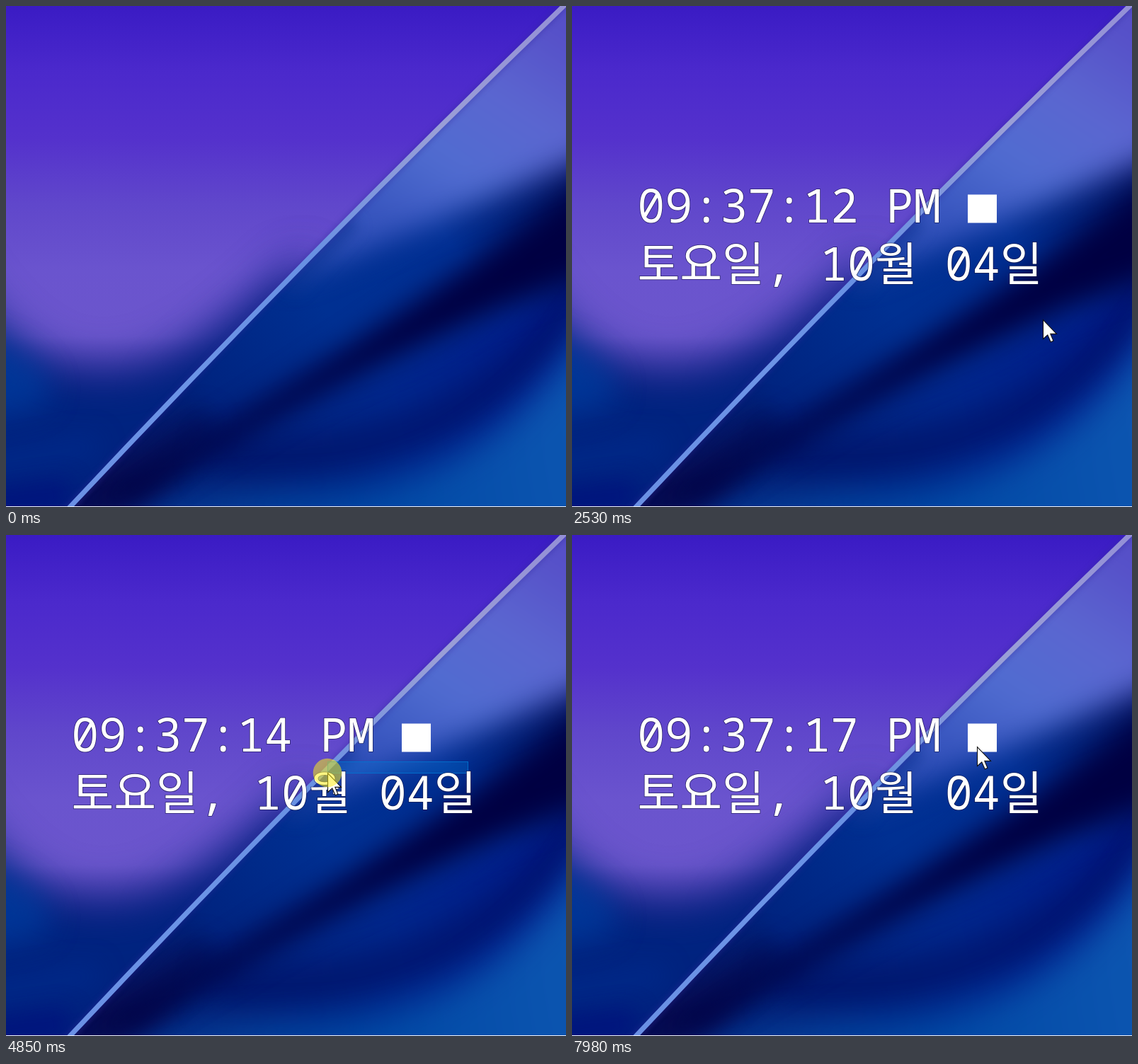
Animation of 791x708 px, one loop 8000 ms. Source, as an HTML page with a canvas:

```html
<!DOCTYPE html>
<html lang="ko">
<head>
<meta charset="utf-8">
<title>Desktop clock</title>
<style>
  html, body { margin: 0; width: 100%; height: 100%; overflow: hidden; background: #001f80; }
  canvas, svg { position: absolute; left: 0; top: 0; width: 791px; height: 708px; }
  text {
    font: 65px "Noto Sans Mono", "Noto Sans CJK KR", "Noto Sans CJK", monospace;
    fill: #fff; white-space: pre;
    stroke: rgba(8, 8, 50, .6); stroke-width: 1.6px; paint-order: stroke;
  }
  .ko { font-family: "Noto Sans CJK KR", "Noto Sans CJK", sans-serif; font-weight: 300; }
</style>
</head>
<body>
<canvas id="wall" width="791" height="708"></canvas>
<svg viewBox="0 0 791 708">
  <rect id="select" fill="#0078d7" fill-opacity=".3" stroke="#0074d2" stroke-opacity=".85"/>
  <g id="clock">
    <text id="time" x="92.2" y="306"></text>
    <rect x="559" y="266.5" width="41" height="40" fill="#fff"/>
    <text x="92.5" y="387.5"><tspan class="ko">토요일</tspan>, 10<tspan class="ko">월</tspan> 04<tspan class="ko">일</tspan></text>
  </g>
  <g id="pointer">
    <path d="M.5.5V27.5L6.8 21.8 11.2 31.8 15 30.2 10.8 20.4H19.5Z" fill="#fff" stroke="#111" stroke-width="1.1"/>
    <circle id="press" r="20.3" fill="#ffee14" fill-opacity=".53"/>
  </g>
</svg>
<script>
const $ = id => document.getElementById(id);
const W = 791, H = 708, LOOP = 8000;

// Wallpaper
const c = $('wall').getContext('2d');

function fade(x0, y0, x1, y1, ...colors) {
  const g = c.createLinearGradient(x0, y0, x1, y1);
  colors.forEach((color, i) => g.addColorStop(i / (colors.length - 1), color));
  return g;
}
function area(d, color, blur) {
  c.filter = `blur(${blur}px)`;
  c.fillStyle = color;
  c.fill(new Path2D(d));
  c.filter = 'none';
}
function line(d, color, width, blur) {
  c.filter = `blur(${blur}px)`;
  c.strokeStyle = color;
  c.lineWidth = width;
  c.stroke(new Path2D(d));
  c.filter = 'none';
}

function paintWall() {
  const ridge = 'M80 719Q430 345 800 -12';

  // violet sky and the blue valley under it
  c.fillStyle = fade(0, 0, 0, 560, '#3a1bc4', '#4b29cc', '#5431cc', '#6047cb', '#6a54ce', '#6b56cc', '#332a98');
  c.fillRect(0, 0, W, H);
  area('M220 530L430 345V720H200Z', 'rgba(42,34,150,.55)', 28);
  area('M-90 340Q95 690 420 355V820H-90Z', '#00237f', 32);
  area('M-60 460Q40 480 60 530T-60 580Z', 'rgba(0,66,166,.6)', 20);
  line('M-60 655L130 620', 'rgba(0,48,150,.5)', 28, 18);
  line('M-40 705L90 690', 'rgba(0,14,125,.7)', 40, 16);

  // folds on the right of the ridge
  c.save();
  c.clip(new Path2D(ridge + 'H820V719Z'));
  c.fillStyle = fade(150, 690, 790, 220, '#080f56', '#002480', '#003092', '#002f93', '#00125e');
  c.fillRect(0, 0, W, H);
  area('M150 730Q420 540 850 380V780H150Z', fade(300, 600, 790, 500, '#04267e', '#00278c', '#001c8c'), 20);
  line('M290 640Q680 650 830 380', 'rgba(0,14,98,.75)', 48, 24);
  area('M150 740Q240 690 420 690Q700 690 850 400V800H150Z', fade(200, 700, 790, 600, '#063a92', '#0048a4', '#0c55b0'), 24);
  area('M90 720L270 570L300 590L180 700Z', 'rgba(5,8,75,.6)', 18);
  area('M850 225Q520 470 130 700H180Q480 510 850 365Z', '#000042', 19);
  area('M390 390Q600 310 850 200V-60H700Z', fade(760, 20, 560, 330, '#564fc8', '#5b66d0', '#506cd0', '#3654bd'), 21);
  line('M400 400L490 303', 'rgba(10,50,145,.55)', 26, 10);
  c.restore();

  line(ridge, 'rgba(50,40,160,.3)', 13, 3);
  line(ridge, fade(90, 705, 785, 0, '#6a90e4', '#6c94e6', '#6890e2', '#9a9fd6', '#9490d6'), 7, .7);
  c.fillStyle = '#f4f4fa';
  c.fillRect(0, H - 1, W, 1);
}

// Pointer stops: arrival time, x, y
const stops = [
  [1360, 0, 0], [1630, 590, 335], [1910, 580, 314], [2120, 580, 314], [2330, 578, 267],
  [2600, 695, 503], [3140, 94, 218], [3430, 90, 290], [4160, 695, 337], [4440, 652, 320],
  [4850, 455, 336], [5180, 50, 339], [5650, 276, 413], [5800, 305, 383], [6410, 691, 238],
  [6770, 335, 413], [7170, 297, 385], [7780, 633, 283], [7980, 572, 299]];
const TRAVEL = 540; // longest trip; any spare time is spent resting first

const GRAB = 2120, DROP = 2390;
const holds = [[GRAB, DROP], [2600, 3280], [4440, 5310], [5650, 6770]];

function tip(t) {
  if (t < stops[0][0]) return [160, 36];
  const i = stops.findIndex(s => s[0] > t);
  if (i < 0) return stops[stops.length - 1].slice(1);
  const [t0, x0, y0] = stops[i - 1], [t1, x1, y1] = stops[i];
  const p = Math.max(0, 1 - (t1 - t) / Math.min(TRAVEL, t1 - t0));
  return [x0 + (x1 - x0) * p, y0 + (y1 - y0) * p].map(Math.round);
}

const show = (id, on) => $(id).style.display = on ? '' : 'none';
const move = (id, x, y) => $(id).setAttribute('transform', `translate(${x} ${y})`);

function draw(t) {
  const [x, y] = tip(t);
  const hold = holds.find(([from, to]) => t >= from && t < to);
  const selecting = hold && hold[0] !== GRAB;

  show('pointer', t >= 1360 || (t >= 500 && t < 570));
  show('press', hold);
  move('pointer', x, y);

  // the clock follows the pointer until it reaches its place
  const [cx, cy] = tip(Math.min(Math.max(t, GRAB), 2330));
  show('clock', t >= 1360);
  move('clock', cx - 578, cy - 267);
  $('time').textContent = `09:37:${10 + Math.floor((t - 120) / 1000)} PM`;

  show('select', selecting);
  if (selecting) {
    const [sx, sy] = tip(hold[0]);
    const box = { x: Math.min(x, sx) + .5, y: Math.min(y, sy) + .5, width: Math.abs(x - sx), height: Math.abs(y - sy) };
    for (const k in box) $('select').setAttribute(k, box[k]);
  }
}

paintWall();
const begin = performance.now();
function tick() {
  draw((performance.now() - begin) % LOOP);
  requestAnimationFrame(tick);
}
tick();
</script>
</body>
</html>
```
